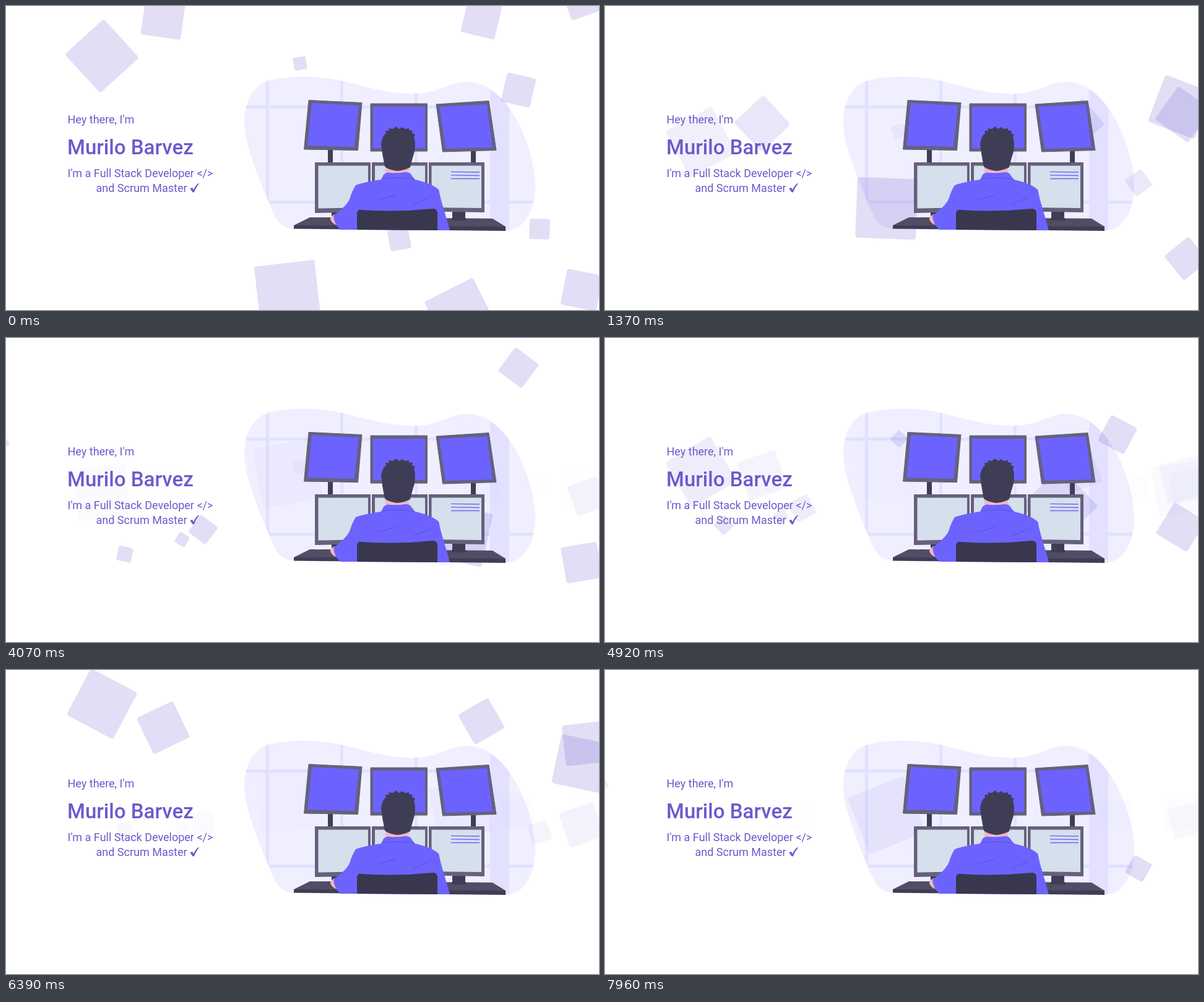
An HTML page that plays this animation: 958x492 px, repeating every 8000 ms.

```html
<!DOCTYPE html>
<html lang="en">
<head>
<meta charset="utf-8">
<title>Intro</title>
<style>
  html, body { margin: 0; width: 100%; height: 100%; overflow: hidden; background: #fff; }
  svg { display: block; width: 958px; height: 492px; }
  text { font: 18px Roboto, Arial, sans-serif; fill: #6a5acd; }
  .name { font-size: 33px; font-weight: 500; }
  .frame { fill: #65617d; }
  .screen { fill: #6c63ff; }
  .pane { fill: #d6dfec; }
  .dark { fill: #3f3d56; }
  .skin { fill: #f2b6c6; }
</style>
</head>
<body>
<svg viewBox="0 0 958 492">
  <defs>
    <clipPath id="blob">
      <path id="outline" d="M385 187C385 155 400 127 424 121C455 112 505 112 542 121C580 130 615 142 660 142C700 142 715 123 745 122.5C780 123 808 152 826 186C845 222 855 262 855 290C855 330 838 361 812 363L465 361C450 360 439 352 432 335C422 312 410 285 400 255C390 228 385 205 385 187Z"/>
    </clipPath>
  </defs>

  <g fill="#6c63ff" fill-opacity=".1">
    <use href="#outline"/>
    <path clip-path="url(#blob)" d="M420 100h5v61h115V100h5v61h115V100h5v61h117V100h31v215h60v5h-60v50h-31V320H665v40h-5V320H545v40h-5V320H425v40h-5V320H380v-5h40V166H380v-5h40zM425 166v149h115V166zM545 166v149h115V166zM665 166v149h117V166z" fill-rule="evenodd"/>
  </g>

  <g id="squares" fill="#6a5acd"></g>

  <g>
    <path class="dark" d="M520 232h8v23h-8zM751 234h8v21h-8z"/>
    <g class="frame" stroke="#65617d" stroke-linejoin="round">
      <path d="M489 152.500L575 156.500L568.500 233.500L481.500 232Z"/>
      <path d="M589 158H680.500V235H589Z"/>
      <path d="M695 159L780 153.500L792 233.500L705.500 236Z"/>
      <path d="M499.500 253.500H588.500V333L499.500 334.500ZM591.500 253.500H680.500V334H591.500ZM683.500 253.500H772.500V333.500L683.500 332Z"/>
    </g>
    <path class="screen" d="M494 157L570 161L563 228L487 226ZM593 163H677V230H593ZM700 163L777 159L786 229L710 231Z"/>
    <path class="pane" d="M504.500 258.500H585V326L504.500 327.500ZM596 258.500H677V327H596ZM687.500 258.500H768V327L687.500 326Z"/>
    <path d="M719 268.300L765 269M719 273.700L765 274.500M719 279.500H765" stroke="#6c63ff" stroke-width="1.300"/>

    <path fill="#504d65" d="M465 355L491 342L786 344L807 357V360L465 357Z"/>
    <path class="dark" d="M465 355L807 357V364L465 360.500ZM526 334h16v10h-16zM721 333h21v10q2 1 2 4h-25q0-3 2-4z"/>

    <path class="skin" d="M531 337Q524 340 524 345Q526 352 535 355L540 345ZM613 259H651V275H613Z"/>
    <path class="screen" d="M610 273Q615 268 621 270Q633 271 645 269Q653 268 656 275L661 281C675 284 690 289 699 297L701 306C704 320 711 340 717 363L540 362Q530 353 529 339C540 332 550 322 555 313Q559 299 565 290C575 286 592 283 606 281Z"/>
    <path d="M607 280Q632 275 660 281M601 314L630 306M657 321L685 309M696 299L700 302" fill="none" stroke="#5850d8"/>
    <path class="dark" d="M606 223Q608 210 614 206L613 202L619 202L618 198L625 199L630 195L635 199L640 196L644 199L651 198L651 201L657 202L656 206L661 208L659 212C662 219 661 233 659 239Q655 252 653 261Q644 266 632 267Q617 265 612 260Q608 242 606 223Z"/>
    <path fill="#39374e" d="M567 362V335Q568 329 574 330Q632 334 690 328Q696 328 697 334V363Z"/>
  </g>

  <text x="99.500" y="190">Hey there, I'm</text>
  <text class="name" x="99" y="239.500">Murilo Barvez</text>
  <text x="99.500" y="277">I'm a Full Stack Developer &lt;/&gt;</text>
  <text x="145.500" y="301">and Scrum Master</text>
  <path fill="#6a5acd" d="M297.500 295.500Q300 293.500 301.500 294.500L303 297.500Q306 290.500 310 287.500L312.500 287Q307 293 304 301.500H301.500Z"/>
</svg>
<script>
const LOOP = 8000, STEP = 77.35;

// Each square eases to rest at the middle of the stage, fading, then turns back.
// Rows: centre x, size, time of rest in seconds.
const fromTop = {
  rest: size => 215 + size / 2, side: -1, period: 9.85, turn: 0.75,
  distance: s => (1.65 * (s + 0.28)) ** 3,
  rows: [[155, 85, 3.12], [254, 65, 3.43], [768, 56, 3.39], [828, 48, 7.29], [475, 21, 2.81],
         [934, 66, 3.62], [929, 81, 3.83], [-8.5, 22, 6.12]]
};
const fromBottom = {
  rest: size => 254 - size / 2, side: 1, period: 14, turn: 0.717,
  distance: s => (0.5 * (s + 2.4)) ** 4 - 1,
  rows: [[455, 98, 5.64], [862, 33, 4.28], [734.5, 88, 8.15], [939, 51, 6.31], [930, 59, 8.56],
         [318.500, 35, 7.56], [284.500, 19, 7.71], [192, 24, 8.14], [635.500, 34, 4.5]]
};

const layer = document.getElementById('squares');
const squares = [fromTop, fromBottom].flatMap(group => group.rows.map(([x, size, restTime]) => {
  const node = document.createElementNS('http://www.w3.org/2000/svg', 'rect');
  const attributes = { x: -size / 2, y: -size / 2, width: size, height: size, rx: size < 30 ? 3 : 4 };
  for (const key in attributes) node.setAttribute(key, attributes[key]);
  layer.append(node);
  return { node, group, x, size, restTime };
}));

function draw(seconds) {
  for (const { node, group, x, size, restTime } of squares) {
    const { period, side, turn } = group;
    const offset = seconds - restTime;
    const d = group.distance(Math.abs(offset - period * Math.round(offset / period)));
    const y = group.rest(size) + side * d;
    node.setAttribute('transform', `translate(${x} ${y}) rotate(${-turn * d})`);
    node.setAttribute('fill-opacity', 0.2 * Math.min(1, d / 75));
  }
}

const start = performance.now();
function tick() {
  const time = (performance.now() - start) % LOOP;
  const step = Math.floor((time + 35) / STEP);
  draw(Math.max(0, step * STEP - 20) / 1000);
  requestAnimationFrame(tick);
}
tick();
</script>
</body>
</html>
```
